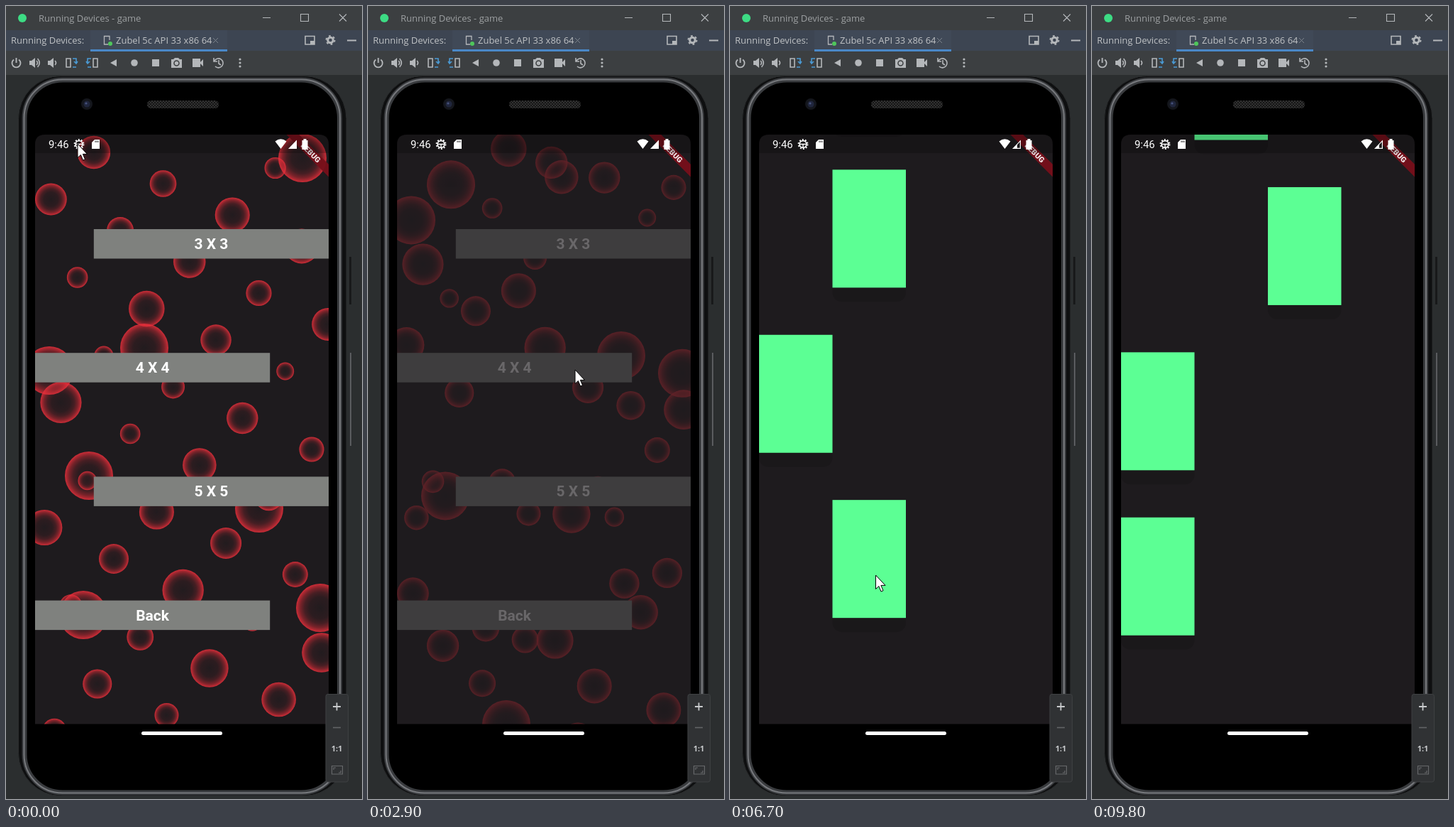
An HTML page for the animation above (9.9 s loop, 502 px wide and 1116 px high).

```html
<!DOCTYPE html>
<html lang="en">
<head>
<meta charset="utf-8">
<title>Running Devices</title>
<style>
  html, body { margin: 0; width: 100%; height: 100%; overflow: hidden; background: #2b2d2e; }
  svg { display: block; width: 502px; height: 1116px; }
  .ide { font: 13px "Open Sans", sans-serif; fill: #bfc2c5; }
  .btn { font: bold 21px Roboto, sans-serif; fill: #fff; text-anchor: middle; }
  .line { fill: none; stroke: #b4b7ba; stroke-width: 1.6; }
  .fill { fill: #b4b7ba; }
</style>
</head>
<body>
<svg viewBox="0 0 502 1116" xmlns="http://www.w3.org/2000/svg">
  <defs>
    <radialGradient id="bubble">
      <stop offset="0" stop-color="#e82c38" stop-opacity=".02"/>
      <stop offset=".45" stop-color="#e82c38" stop-opacity=".07"/>
      <stop offset=".65" stop-color="#e82c38" stop-opacity=".2"/>
      <stop offset=".82" stop-color="#e82c38" stop-opacity=".45"/>
      <stop offset="1" stop-color="#ee303c" stop-opacity=".85"/>
    </radialGradient>
    <pattern id="mesh" width="4" height="4" patternUnits="userSpaceOnUse">
      <path d="M0 4L4 0M0 0L4 4" stroke="#3a3a3a" stroke-width=".8"/>
    </pattern>
    <clipPath id="screen">
      <path d="M41 1010.500V195Q41 181 55 181H441Q455 181 455 195V1010.500Z"/>
    </clipPath>
  </defs>

  <!-- window -->
  <rect width="502" height="1116" fill="#2b2e2f"/>
  <rect width="502" height="34" fill="#3c3f41"/>
  <circle cx="23" cy="17" r="6" fill="#3ddc84"/>
  <text class="ide" x="46" y="21.500" style="fill:#9da0a2">Running Devices - game</text>
  <path class="line" style="stroke-width:1.1" d="M362 16.500H373M415.500 11.500H426.500V21.500H415.500ZM470 11.500L480 21.500M480 11.500L470 21.500"/>
  <rect y="34" width="502" height="29" fill="#3d4552"/>
  <rect x="119" y="34" width="193" height="29" fill="#404957"/>
  <text class="ide" x="7" y="53">Running Devices:</text>
  <path class="line" style="stroke-width:1.3" d="M144 54H138.500V42.500H146V48"/>
  <circle cx="147" cy="53" r="3" fill="#4fc65b"/>
  <text class="ide" x="155" y="53">Zubel 5c API 33 x86 64</text>
  <path d="M292 45L299 52M299 45L292 52" stroke="#7c838b"/>
  <path class="line" d="M422 42.500H435V54H422Z"/>
  <path class="fill" d="M429 49H435V54H429Z"/>
  <circle class="line" cx="457.500" cy="48" r="3.800" style="stroke-width:3"/>
  <circle class="line" cx="457.500" cy="48" r="6" style="stroke-width:2;stroke-dasharray:2.700 3.580"/>
  <path class="line" d="M481 48.500H494" style="stroke-width:2"/>
  <rect y="63" width="502" height="34" fill="#3c3f41"/>
  <rect x="119" y="61" width="193" height="3" fill="#4a88c7"/>

  <!-- toolbar -->
  <path class="line" style="stroke-width:1.900" d="M11 75.500A6 6 0 1 0 18 75.500M14.500 73V80"/>
  <path class="fill" d="M33 77H36L41 73V87L36 83H33ZM59 77H62L67 73V87L62 83H59Z"/>
  <path class="line" d="M43 77Q46 80 43 83M44.500 74Q50 80 44.500 86M69 77Q72 80 69 83"/>
  <path class="line" d="M85 74H91V86H85ZM123 74H129V86H123Z"/>
  <path class="line" style="stroke:#4a9ad4" d="M94 74H99V80M96 78L99 81L101 78M99 86H94M120 74H115V80M113 78L115 81L118 78M115 86H120"/>
  <path class="fill" d="M147 80L156 75V85ZM206 75H216V85H206Z"/>
  <circle class="fill" cx="181" cy="80" r="4.800"/>
  <path class="fill" d="M233 75H236L238 73H243L245 75H248V87H233Z"/>
  <circle cx="240.500" cy="80.500" r="3.500" fill="#b4b7ba" stroke="#3c3f41" stroke-width="1.500"/>
  <path class="fill" d="M263 74H274V79L278 75V85L274 81V86H263Z"/>
  <path class="line" d="M294 77A6.500 6.500 0 1 1 295 85M293 73V78H298M300 76V81L303 83"/>
  <g class="fill"><circle cx="330" cy="75" r="1.600"/><circle cx="330" cy="80" r="1.600"/><circle cx="330" cy="85" r="1.600"/></g>

  <!-- phone -->
  <path d="M485.500 353V420" stroke="#18191a" stroke-width="3"/>
  <path d="M486 488V619" stroke="#5a5c5f" stroke-width="2"/>
  <rect x="17.500" y="98.500" width="462.500" height="1013" rx="60" fill="#0e0f10" stroke="#2b2d2e"/>
  <rect x="26" y="104" width="444.500" height="1003" rx="54" fill="#000" stroke="#393b3e" stroke-width="7"/>
  <rect x="25.500" y="103.500" width="445.500" height="1004" rx="54" fill="none" stroke="#77797d" stroke-width="2"/>
  <circle cx="114" cy="138" r="8" fill="#14161c"/>
  <circle cx="114" cy="138" r="4.500" fill="#20263d"/>
  <circle cx="113" cy="137" r="1.600" fill="#46527c"/>
  <rect x="199" y="133" width="101" height="11" rx="5.500" fill="#161616"/>
  <rect x="199" y="133" width="101" height="11" rx="5.500" fill="url(#mesh)"/>

  <!-- screen -->
  <g clip-path="url(#screen)">
    <rect x="41" y="181" width="414" height="830" fill="#1e1b1e"/>
    <g id="tiles"></g>
    <g id="menu"><g id="bubbles" fill="url(#bubble)"></g></g>
    <path d="M395.500 181H413.300L455 222.700V240.600Z" fill="#760f1a" fill-opacity=".95"/>
    <text transform="translate(429.700 206.300) rotate(45)" y="3.800" text-anchor="middle"
      style="font:900 10.700px Roboto,sans-serif;fill:#f3e9ea">DEBUG</text>
    <rect x="41" y="181" width="414" height="26" fill="#000" fill-opacity=".23"/>
  </g>
  <text x="60" y="200" style="font:14.800px Roboto,sans-serif;fill:#fff">9:46</text>
  <g fill="none" stroke="#fff">
    <circle cx="103" cy="194.500" r="4.900" stroke-width="1.700"/>
    <circle cx="103" cy="194.500" r="6.500" stroke-width="1.800" stroke-dasharray="2 2.084"/>
    <path d="M98 194.500H108M103 194.500V199" stroke-width="1.400"/>
  </g>
  <path d="M121 192L125 188H132V201H121Z" fill="#fff"/>
  <path d="M126 189.500V192M128 189.500V192M130 189.500V192" stroke="#1e1b1e" stroke-width=".9"/>
  <path d="M379.500 190.500Q387.500 184 395.500 190.500L387.500 201Z" fill="#fff"/>
  <path d="M398 201L410 188.500V201Z" fill="#fff"/>
  <path id="weak" d="M405 199.800V195.300L408.800 191.200V199.800Z" fill="#1b181b"/>
  <path d="M417.500 189H419.500V187H423.500V189H425.500V202H417.500Z" fill="#fff"/>
  <rect x="191" y="1021" width="114" height="5" rx="2.500" fill="#fff"/>

  <!-- zoom panel -->
  <rect x="451" y="968.500" width="31.500" height="123.500" rx="3" fill="#303234" stroke="#3f4143"/>
  <path d="M461 986H472M466.500 980.500V991.500" stroke="#c8cacc" stroke-width="1.800"/>
  <path d="M461 1015.500H472" stroke="#626466" stroke-width="1.600"/>
  <text x="466.500" y="1049" text-anchor="middle" style="font:bold 11px 'Open Sans',sans-serif;fill:#c8cacc">1:1</text>
  <path d="M459.500 1069.500H474.500V1081H459.500ZM462 1075V1072H465M472 1076V1079H469" fill="none" stroke="#66686a" stroke-width="1.200"/>

  <path id="cursor" d="M0 0V19.500L4.400 15.500L7.500 23L10.500 21.700L7.400 14.400H13.500Z" fill="#fff" stroke="#000"/>
</svg>

<script>
const LOOP = 9900, STEP = 100;
const LEFT = 41, TOP = 181, WIDTH = 414;
const TILE_W = WIDTH / 4, TILE_H = 166, GAP = TILE_H * 1.4;
const GAME = 3500, SPEED = .3078;
const $ = id => document.getElementById(id);

function add(parent, tag, attrs, text) {
  const el = document.createElementNS("http://www.w3.org/2000/svg", tag);
  for (const k in attrs) el.setAttribute(k, attrs[k]);
  if (text) el.textContent = text;
  return parent.appendChild(el);
}

function seeded(seed) {
  return () => (seed = (seed * 16807) % 2147483647) / 2147483647;
}

// Bubbles: a few large ones, the rest scattered evenly down the page.
const rand = seeded(20);
const between = (a, b) => a + (b - a) * rand();
const large = [
  [418, 214, 76], [61, 513, 125], [117, 661, 242], [357, 707, 127],
  [195, 481, 254], [443, 847, 195], [109, 857, 99]
].map(([x, y, rise]) => ({ x, y, rise, r: 34 }));
const small = Array.from({ length: 44 }, (_, i) => ({
  x: LEFT + WIDTH * ((i * .618 + .2) % 1),
  y: 206 + 22 * i,
  rise: between(70, 250),
  r: between(12, 30)
}));
const bubbles = [...small, ...large];
for (const b of bubbles) b.el = add($("bubbles"), "circle", { r: b.r, cx: b.x });

["3 X 3", "4 X 4", "5 X 5", "Back"].forEach((label, i) => {
  const width = WIDTH * .8, x = i % 2 ? LEFT : LEFT + WIDTH - width, y = 314 + i * 174.2;
  add($("menu"), "rect", { x, y, width, height: 41.5, fill: "#7f817e" });
  add($("menu"), "text", { x: x + width / 2, y: y + 28, class: "btn" }, label);
});

// Tiles: the column of each, and when the first ones are tapped away.
const COLUMNS = [3, 1, 0, 1, 1, 0, 0, 2, 1];
const TAPS = [6000, 6800, 7500, 8200, 8600];
const tiles = COLUMNS.map(col => {
  const g = add($("tiles"), "g", {});
  const x = LEFT + col * TILE_W;
  add(g, "rect", { x, y: TILE_H - 20, width: TILE_W, height: 40, rx: 13, fill: "#000", "fill-opacity": .13 });
  add(g, "rect", { x, width: TILE_W, height: TILE_H, fill: "#5cff94" });
  return g;
});

// Pointer stops: time, x, y.
const STOPS = [
  [0, 101, 194], [800, 160.5, 689], [1800, 287.5, 589], [2300, 292, 512], [GAME, 292, 512],
  [4700, 411.5, 754], [5300, 409, 798], [6000, 409, 798], [6700, 205.5, 801],
  [7300, 95, 800], [8200, 203, 800], [8400, 205, 686]
];

function pointer(t) {
  const i = STOPS.findIndex(s => s[0] > t);
  if (i < 0) return STOPS[STOPS.length - 1].slice(1);
  const [t0, x0, y0] = STOPS[i - 1], [t1, x1, y1] = STOPS[i];
  const f = (t - t0) / (t1 - t0);
  return [x0 + (x1 - x0) * f, y0 + (y1 - y0) * f];
}

function show(el, on) {
  el.style.display = on ? "" : "none";
}

function draw(t) {
  // The bubbles start a little slower than they go on.
  const risen = t < 800 ? t * .00046 : .37 + (t - 800) * .00063;
  for (const b of bubbles) {
    const y = b.y - b.rise * risen;
    b.el.setAttribute("cy", y < TOP - b.r ? y + 960 : y);
  }
  const opacity = Math.min(1, Math.max(0, (3000 - t) / 300));
  show($("menu"), opacity > 0);
  $("menu").setAttribute("opacity", opacity);

  const fall = (t - GAME) * SPEED - 6;
  tiles.forEach((g, i) => {
    show(g, t >= GAME && t < (TAPS[i] || LOOP));
    g.setAttribute("transform", `translate(0 ${TOP + fall - GAP * (i + 1)})`);
  });

  show($("weak"), t >= GAME);
  show($("cursor"), t < 8600);
  $("cursor").setAttribute("transform", `translate(${pointer(t).join(" ")})`);
}

const start = performance.now();
function tick() {
  const t = (performance.now() - start) % LOOP;
  draw(Math.floor(t / STEP) * STEP);
  requestAnimationFrame(tick);
}
tick();
</script>
</body>
</html>
```
